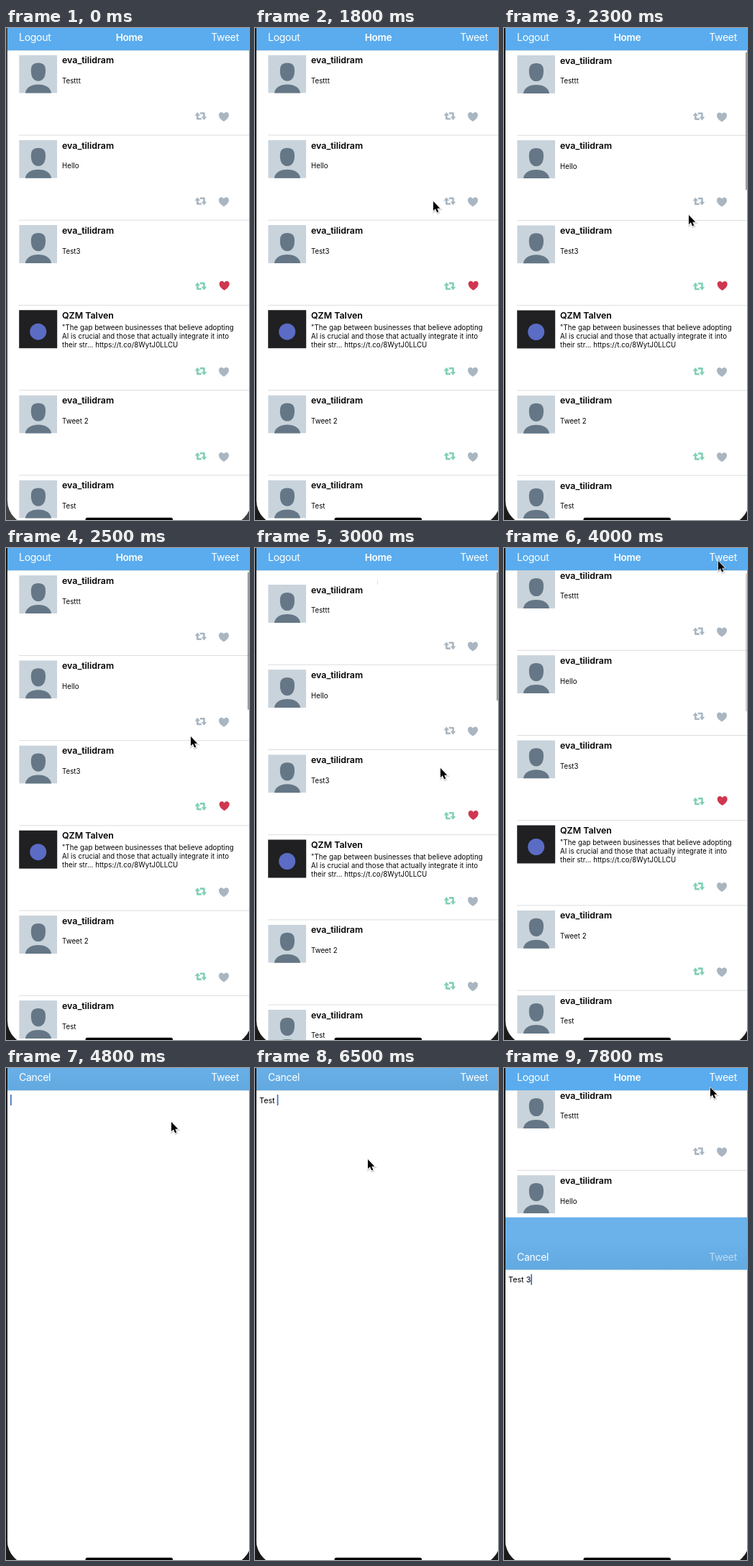
An HTML page for the animation above (8000 ms loop, 338 px wide and 684 px high).

```html
<!DOCTYPE html>
<html lang="en">
<head>
<meta charset="utf-8">
<title>Timeline</title>
<style>
  html, body { margin: 0; width: 100%; height: 100%; overflow: hidden; background: #1b1b1b; }
  svg { display: block; width: 338px; height: 684px; }
  text { font-family: Inter, Roboto, sans-serif; white-space: pre; }
  .nav { font-size: 14px; letter-spacing: -.02em; fill: #fff; }
  .home { font-size: 13.6px; font-weight: 600; }
  .name { font-size: 12.4px; font-weight: 600; }
  .body { font-size: 9.65px; letter-spacing: .006em; }
  .draft { font-size: 10.8px; }
</style>
</head>
<body>
<svg viewBox="0 0 338 684">
  <defs>
    <clipPath id="screen"><rect x="2" y="-43" width="339" height="734" rx="34"/></clipPath>
    <clipPath id="tile"><rect width="53" height="53"/></clipPath>
    <linearGradient id="sheetBar" x1="0" y1="0" x2="0" y2="1">
      <stop offset=".45" stop-color="#6bb2eb"/><stop offset="1" stop-color="#62a9e0"/>
    </linearGradient>
    <g id="person" clip-path="url(#tile)">
      <rect width="53" height="53" fill="#c9d3db"/>
      <g fill="#657786">
        <path d="M26.7 11C34 11 36.8 14.5 36.8 22C36.8 31 33 36.2 26.7 36.2S16.6 31 16.6 22C16.6 14.5 19.4 11 26.7 11Z"/>
        <path d="M8.5 54C9 46 16 41 26.7 41S44.4 46 45 54Z"/>
      </g>
    </g>
    <g id="brand">
      <rect width="53" height="53" fill="#202022"/>
      <circle cx="26.5" cy="30" r="11.5" fill="#5a6cc4"/>
    </g>
    <g id="repost">
      <path d="M4 4V9.5H9.5M7.5 1.7H13.2V7.5" fill="none" stroke="currentColor" stroke-width="2.6" stroke-linejoin="round"/>
      <path d="M.2 5L4 .3L7.8 5ZM9.4 6.5H17L13.2 11.3Z" fill="currentColor"/>
    </g>
    <path id="heart" d="M7 13C3 10.5 0 7.5 0 4C0 -.4 5 -1.4 7 2.1C9 -1.4 14 -.4 14 4C14 7.5 11 10.5 7 13Z" fill="currentColor"/>
    <path id="arrow" d="M0 0V14.5L3.3 11.5L5.7 17L8.1 16L5.8 10.7H10.3Z"/>
  </defs>

  <rect id="bezel" width="338" height="684"/>
  <g clip-path="url(#screen)">
    <rect width="341" height="691" fill="#fff"/>
    <path id="spinner" d="M170.5 44V51" stroke="#e2e2e4"/>
    <g id="list"></g>
    <rect id="scrollbar" x="336" width="2.4" rx="1.2" fill="#000"/>
    <rect width="341" height="31" fill="#5aacee"/>
    <rect y="31" width="341" height=".5" fill="#c5ccd2"/>
    <text class="nav" x="18" y="18">Logout</text>
    <text class="nav home" x="171.5" y="18" text-anchor="middle">Home</text>
    <text class="nav" x="324" y="18" text-anchor="end">Tweet</text>

    <g id="sheet">
      <rect y="-42" width="341" height="734" fill="#fff"/>
      <rect y="-42" width="341" height="73" fill="url(#sheetBar)"/>
      <rect y="31" width="341" height=".5" fill="#c5ccd2"/>
      <text class="nav" x="18" y="18">Cancel</text>
      <text class="nav" id="send" x="324" y="18" text-anchor="end">Tweet</text>
      <text class="draft" id="draft" x="6" y="48.5"></text>
      <rect id="caret" y="37" width="1.7" height="15" fill="#416fc0"/>
    </g>
    <rect x="110.5" y="680.7" width="121.5" height="5" rx="2.5"/>
  </g>
  <g id="cursor">
    <g transform="scale(.9)">
      <use href="#arrow" x=".6" y="1.4" fill="none" stroke="#000" stroke-opacity=".16" stroke-width="3"/>
      <use href="#arrow" stroke="#fff" stroke-width="1.4" paint-order="stroke"/>
    </g>
  </g>
</svg>
<script>
const $ = id => document.getElementById(id);
const LOOP = 8000, ROW = 118.2, TOP = 30.8, HIDDEN = 740;
const GRAY = '#a9b6c1', GREEN = '#82d0b5', RED = '#d0364f';
const USER = 'eva_tilidram';

const posts = [
  { lines: ['Testtt'] },
  { lines: ['Hello'] },
  { lines: ['Test3'], shared: true, liked: true },
  { name: 'QZM Talven', tile: 'brand', shared: true, lines: [
    '"The gap between businesses that believe adopting',
    'AI is crucial and those that actually integrate it into',
    'their str... https://t.co/8WytJ0LLCU'] },
  { lines: ['Tweet 2'], shared: true },
  { lines: ['Test'] },
];

function row({ name = USER, tile = 'person', lines, shared, liked }, i) {
  const first = 46.4 - 6 * (lines.length - 1);
  const body = lines.map((line, n) =>
    `<text class="body" x="78" y="${first + 12 * n}">${line}</text>`).join('');
  return `<g transform="translate(0 ${TOP + ROW * i})">
    <use href="#${tile}" x="18.2" y="6.8"/>
    <text class="name" x="78" y="18.5">${name}</text>${body}
    <use href="#repost" x="262.3" y="86" color="${shared ? GREEN : GRAY}"/>
    <use href="#heart" x="${liked ? 296.7 : 296}" y="${liked ? 84.6 : 86.3}" color="${liked ? RED : GRAY}"/>
    <path d="M18 ${ROW}H341" stroke="#dcdde0"/></g>`;
}
$('list').innerHTML = posts.map(row).join('');

// Each track holds [start time, value...] until its next entry.
const pointer = [
  [0, -40, -40], [300, 231, 102], [800, 225, 106], [1000, 218, 111], [1300, 253, 196],
  [1500, 248, 241], [2300, 257, 260], [2500, 257, 262], [2800, 258, 285], [3000, 258, 306],
  [3300, 258, 312], [3500, 259, 280], [3800, 285, 80], [4000, 298, 18], [4800, 230, 75],
  [5000, 157, 127], [6800, 170, 122], [7000, 200, 109], [7300, 265, 52], [7500, 287, 27],
];
const scroll = [[0, 0], [2300, .3], [2500, .5], [2800, 7], [3000, 13.3], [3300, 15], [3500, -1], [3800, -6.7]];
const sheetY = [[0, HIDDEN], [4300, 250], [4500, 0], [7800, 249.6]];
const typed = [[0, ''], [5800, 'Te'], [6000, 'Test'], [6300, 'Test '], [6800, 'Test 3']];
const caretOn = [[0, 1], [5500, 0], [5800, 1]];

const at = (track, t) => track.findLast(entry => entry[0] <= t).slice(1);
const move = (id, x, y) => $(id).setAttribute('transform', `translate(${x} ${y})`);

function draw(t) {
  const [offset] = at(scroll, t), [text] = at(typed, t);
  move('cursor', ...at(pointer, t));
  move('list', 0, offset);
  move('sheet', 0, at(sheetY, t)[0]);
  $('bezel').setAttribute('fill', t < 1800 ? '#414143' : '#1b1b1b');

  $('spinner').style.opacity = offset > 10 ? 1 : 0;
  $('scrollbar').setAttribute('y', 33.5 + Math.max(0, -offset * .25));
  $('scrollbar').setAttribute('height', 192 - Math.max(0, offset));
  $('scrollbar').style.opacity = t < 2300 || t >= 4300 ? 0 : t < 4000 ? .38 : .18;

  $('send').style.opacity = t < 7500 ? 1 : .55;
  if ($('draft').textContent !== text) $('draft').textContent = text;
  $('caret').setAttribute('x', 6 + (text && $('draft').getComputedTextLength()));
  $('caret').style.opacity = at(caretOn, t)[0];
}

function tick() {
  draw(performance.now() % LOOP);
  requestAnimationFrame(tick);
}
tick();
</script>
</body>
</html>
```
